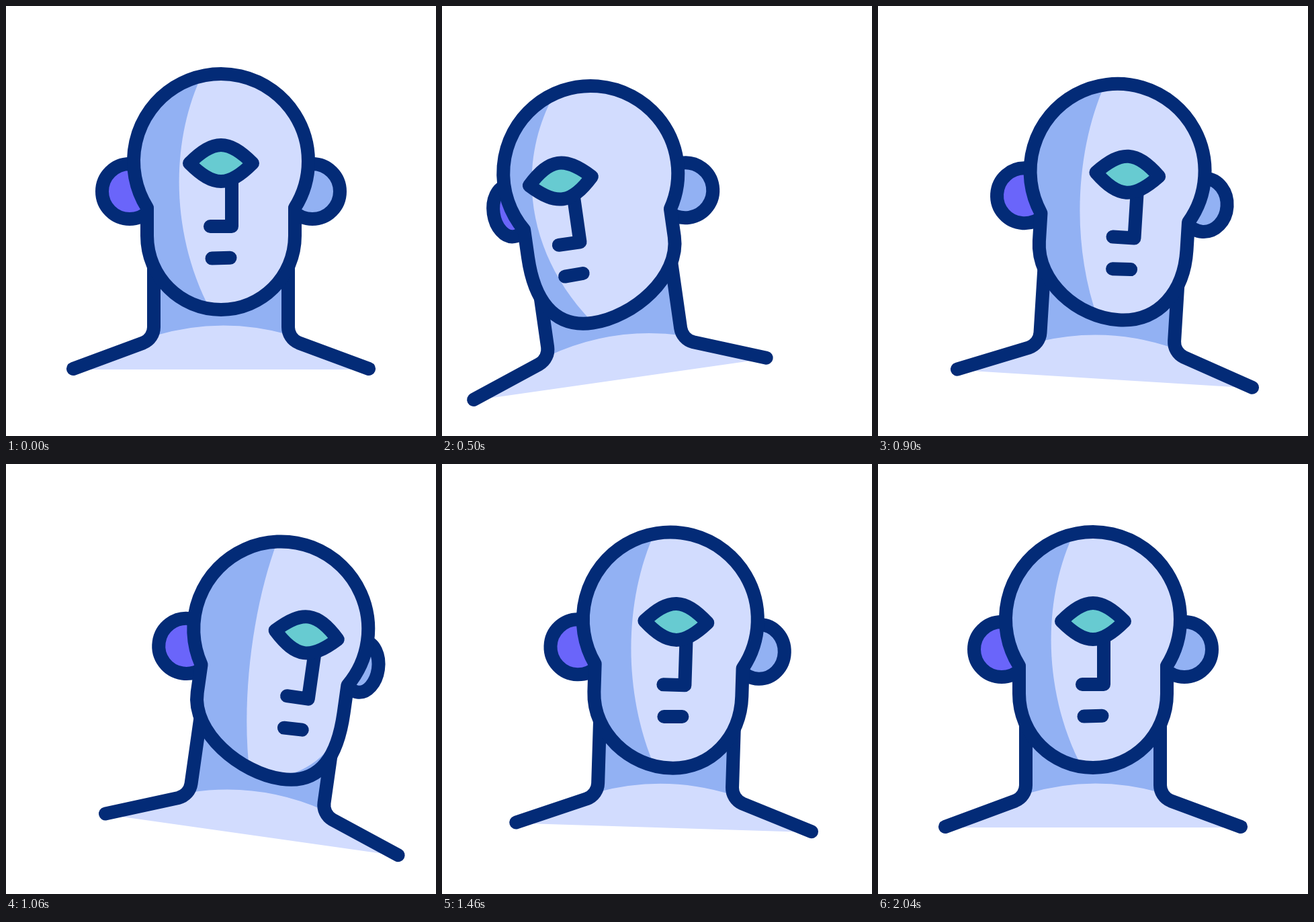
An HTML page with a canvas that plays this animation: 640 by 640 pixels, repeating every 2.4 s.

```html
<!DOCTYPE html>
<html lang="en">
<head>
<meta charset="utf-8">
<title>Turning head</title>
<style>
html, body { margin: 0; width: 100%; height: 100%; overflow: hidden; background: #fff; }
canvas { display: block; width: 640px; height: 640px; }
</style>
</head>
<body>
<canvas id="stage"></canvas>
<script>
const LOOP = 2400;
const NAVY = '#032b77', LIGHT = '#d2dcfe', MID = '#92b1f3', PURPLE = '#6a65fa', TEAL = '#67cbd1';

const canvas = document.getElementById('stage');
const ctx = canvas.getContext('2d');
const dpr = window.devicePixelRatio || 1;
canvas.width = canvas.height = 640 * dpr;

// x, y: drift of the figure; tilt: degrees; look: shift of the face; jaw: shift of the chin
const REST = { x: 0, y: 0, tilt: 0, look: 0, lift: 0, jaw: 0, side: 0 };
const LEFT = { x: -88, y: 17.5, tilt: -8.3, look: -47, lift: 2.2, jaw: -29, side: -1 };
const RIGHT = { x: 79, y: 13.5, tilt: 8.3, look: 40, lift: 0.5, jaw: 33, side: 1 };

const MOVES = [
  { from: REST, to: LEFT, start: 0, end: 600, ease: bezier(0.8, 0.25), bend: p => Math.pow(p, 1.35) },
  { from: LEFT, to: RIGHT, start: 600, end: 1140, ease: bezier(0.82, 0.2), bend: p => p },
  { from: RIGHT, to: REST, start: 1140, end: 1700, ease: bezier(0.75, 0.2), bend: p => 1 - Math.pow(1 - p, 2.2) }
];

// cubic-bezier(x1, 0, x2, 1)
function bezier(x1, x2) {
  return x => {
    let lo = 0, hi = 1;
    for (let i = 0; i < 30; i++) {
      const t = (lo + hi) / 2, u = 1 - t;
      if (3 * u * u * t * x1 + 3 * u * t * t * x2 + t * t * t < x) lo = t;
      else hi = t;
    }
    return lo * lo * (3 - 2 * lo);
  };
}

function poseAt(time) {
  const move = MOVES.find(m => time < m.end);
  if (!move) return REST;
  const p = move.ease((time - move.start) / (move.end - move.start));
  const pose = {};
  for (const key in REST) {
    const k = key === 'y' ? move.bend(p) : p;
    pose[key] = move.from[key] + (move.to[key] - move.from[key]) * k;
  }
  return pose;
}

function paint(path, fill) {
  if (fill) {
    ctx.fillStyle = fill;
    ctx.fill(path);
  }
  ctx.stroke(path);
}

function headPath(jaw) {
  const path = new Path2D();
  const chin = 320 + jaw, h = 60.75;
  const a = Math.acos(110 / 130);
  path.arc(320, 231, 130, Math.PI - a, a);
  path.lineTo(430, 342);
  path.bezierCurveTo(430, 342 + h, chin + h, 452, chin, 452);
  path.bezierCurveTo(chin - h, 452, 210, 342 + h, 210, 342);
  path.closePath();
  return path;
}

const SHOULDERS = 'M100 540L204 501.5C214 497.5 220 488 220 478V380';
const leftLine = new Path2D(SHOULDERS);
const rightLine = new Path2D('M540 540L436 501.5C426 497.5 420 488 420 478V380');
const torso = new Path2D(SHOULDERS + 'H420V478C420 488 426 497.5 436 501.5L540 540V541H100Z');
const neckShade = new Path2D('M220 380H420V489Q320 461 220 491Z');
const restHead = headPath(0);
const eye = new Path2D('M273 234C292 215 306 207 320 207S348 215 367 234C348 253 334 261 320 261S292 253 273 234Z');
const nose = new Path2D('M336 262V328H304');
const mouth = new Path2D('M306.5 375.6L333.5 374.8');

// dir is -1 for the left ear and 1 for the right; far goes to 1 as it turns away
function drawEar(dir, far, fill) {
  const ear = new Path2D();
  ear.ellipse(320 + dir * (136 - 10 * far), 276 - 6 * far, 41 - 16 * far, 41 - 3 * far, 0, 0, 2 * Math.PI);
  paint(ear, fill);
}

function drawBody() {
  ctx.fillStyle = LIGHT;
  ctx.fill(torso);
  ctx.fillStyle = MID;
  ctx.fill(neckShade);
  paint(leftLine);
  paint(rightLine);
}

function drawHead(pose) {
  const head = headPath(pose.jaw);
  const { look } = pose;
  const bulge = 244 + 0.78 * look;
  const lit = new Path2D();
  lit.moveTo(293 + 0.1 * look, 100);
  lit.bezierCurveTo(bulge, 200, bulge, 340, 305 + 0.25 * Math.min(look, 0), 454);
  lit.lineTo(460, 454);
  lit.lineTo(460, 100);
  lit.closePath();

  ctx.fillStyle = MID;
  ctx.fill(head);
  ctx.save();
  ctx.clip(head);
  ctx.clip(restHead);
  ctx.fillStyle = LIGHT;
  ctx.fill(lit);
  ctx.restore();
  ctx.stroke(head);
}

function drawFace(pose) {
  ctx.save();
  ctx.translate(pose.look, pose.lift);
  paint(nose);
  paint(eye, TEAL);
  paint(mouth);
  ctx.restore();
}

function draw(time) {
  const pose = poseAt(time);
  ctx.setTransform(dpr, 0, 0, dpr, 0, 0);
  ctx.fillStyle = '#fff';
  ctx.fillRect(0, 0, 640, 640);
  ctx.translate(320 + pose.x, 320 + pose.y);
  ctx.rotate(pose.tilt * Math.PI / 180);
  ctx.translate(-320, -320);
  ctx.strokeStyle = NAVY;
  ctx.lineWidth = 20;
  ctx.lineCap = ctx.lineJoin = 'round';

  drawBody();
  drawEar(-1, Math.max(0, -pose.side), PURPLE);
  drawEar(1, Math.max(0, pose.side), MID);
  drawHead(pose);
  drawFace(pose);
}

const begin = performance.now();
function tick() {
  draw((performance.now() - begin) % LOOP);
  requestAnimationFrame(tick);
}
tick();
</script>
</body>
</html>
```
